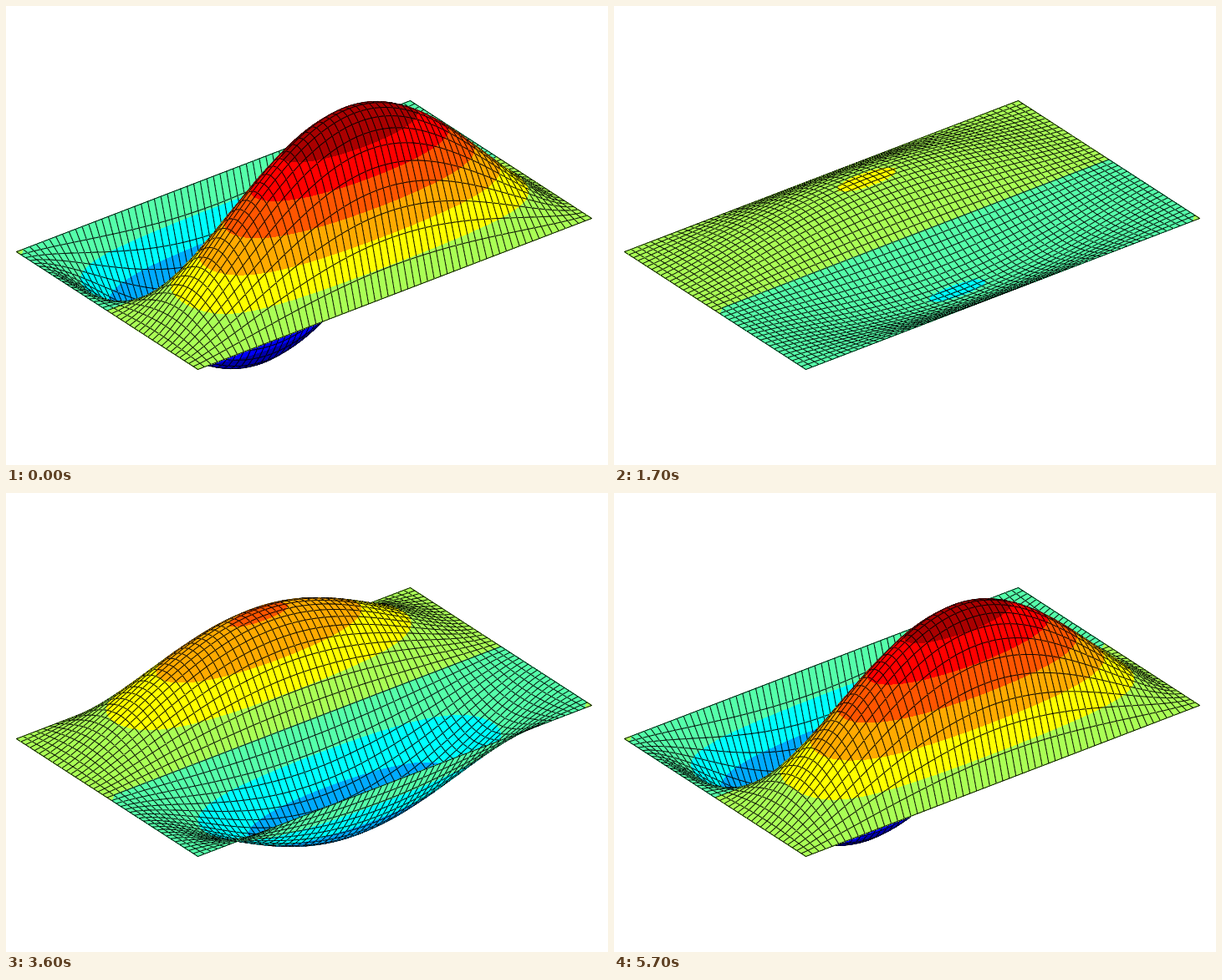
Recreate the animation shown at these times as a matplotlib script. Size 720 px wide and 550 px high, loop 5.8 s.

```python
from functools import lru_cache

import numpy as np
import matplotlib.pyplot as plt
from matplotlib.animation import FuncAnimation
from matplotlib.collections import PolyCollection

W, H, DPI = 720, 550, 100
FRAMES, INTERVAL = 58, 100
NU, NV = 60, 40          # cells along the long and the short side
LIFT = 187               # height of the full swing in pixels
POWER = 1.27             # sharpens the half wave along the long side
BANDS = 6                # colour bands on each side of zero
LINE = 0.9 * 72 / DPI

# Screen plane as complex numbers, y pointing down
CORNER, LONG, SHORT = 12.5 + 294.5j, 471 - 181j, 217 + 141j

u = np.linspace(0, 1, NU + 1)
v = np.linspace(0, 1, NV + 1)[:, None]
BASE = CORNER + LONG * u + SHORT * v
MODE = -np.round(np.abs(np.sin(np.pi * u)) ** POWER * np.sin(2 * np.pi * v), 9)


def jet():
    """Stepped rainbow from dark blue to dark red."""
    k = np.arange(2 * BANDS)
    ramp = lambda lo, hi: np.clip(np.minimum(k - lo, hi - k) / 3, 0, 1)
    return np.column_stack([ramp(4, 13), ramp(1, 10), ramp(-2, 7),
                            np.ones(2 * BANDS)])


CLEAR = 2 * BANDS
COLORS = np.vstack([jet(), [0, 0, 0, 0]])


def clip_above(pts, z, level):
    """Part of a triangle where z is at least level, as four points."""
    out = []
    for i in range(3):
        a, b = z[i - 1] - level, z[i] - level
        if (a >= 0) != (b >= 0):
            out.append(pts[i - 1] + (pts[i] - pts[i - 1]) * a / (a - b))
        if b >= 0:
            out.append(pts[i])
    return out + out[-1:] * (4 - len(out))


def band(k):
    return min(max(k + BANDS, 0), 2 * BANDS - 1)


@lru_cache(maxsize=None)
def build(amp):
    """Polygons from back to front, with their colour indices."""
    height = MODE * amp
    pos = (BASE - 1j * LIFT * height).tolist()
    val = (height * BANDS).tolist()
    polys, fills = [], []

    def add(poly, fill):
        polys.append(poly)
        fills.append(fill)

    for j in range(NV):
        for i in range(NU - 1, -1, -1):
            ring = (j, i), (j, i + 1), (j + 1, i + 1), (j + 1, i)
            quad = [pos[r][c] for r, c in ring]
            z = [val[r][c] for r, c in ring]
            low = int(np.floor(min(z)))
            add(quad, band(low))
            if max(z) >= low + 1:
                for ids in (0, 1, 3), (1, 2, 3):
                    pts = [quad[n] for n in ids]
                    tri = [z[n] for n in ids]
                    k = low + 1
                    while k < max(tri) - 1e-7 or k <= min(tri):
                        add(clip_above(pts, tri, k), band(k))
                        k += 1
            add(quad, CLEAR)
    verts = np.array(polys).view(float).reshape(-1, 4, 2)
    return verts, np.array(fills)


fig = plt.figure(figsize=(W / DPI, H / DPI), dpi=DPI, facecolor="white")
ax = fig.add_axes([0, 0, 1, 1])
ax.set(xlim=(0, W), ylim=(H, 0))
ax.axis("off")
surface = PolyCollection([], edgecolors="black", joinstyle="round")
ax.add_collection(surface, autolim=False)


def update(n):
    half = FRAMES / 2
    verts, fills = build(2 * abs(n - half) / half - 1)
    is_line = fills == CLEAR
    surface.set_verts(verts)
    surface.set_facecolor(COLORS[fills])
    surface.set_linewidth(LINE * is_line)
    surface.set_antialiased(is_line)
    return [surface]


anim = FuncAnimation(fig, update, frames=FRAMES, interval=INTERVAL, repeat=True)
plt.show()
```
